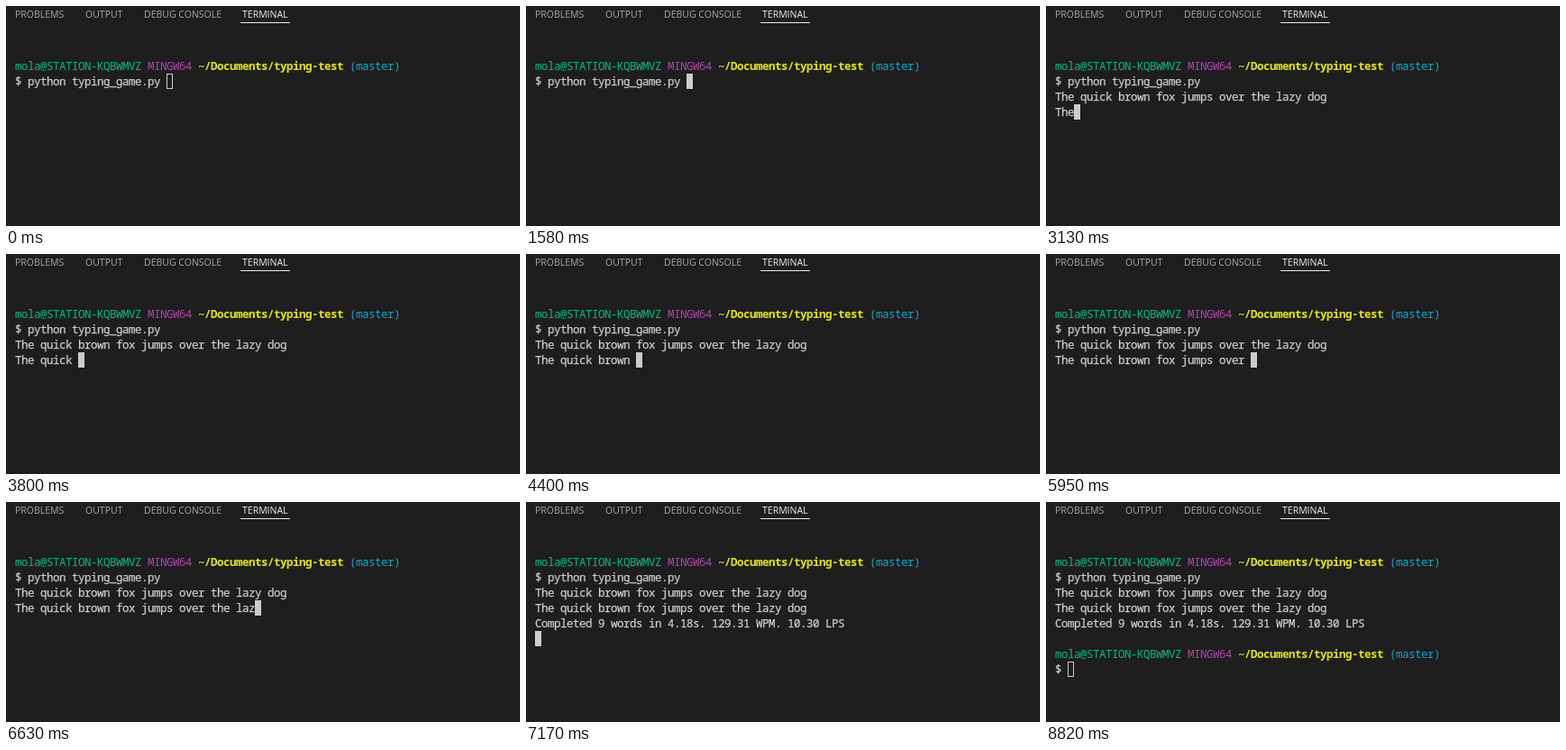
Animation, 570 px wide and 244 px high, one loop 8890 ms. Source, as an HTML page:

```html
<!DOCTYPE html>
<html lang="en">
<head>
<meta charset="utf-8">
<title>Typing test</title>
<style>
html, body { margin: 0; width: 100%; height: 100%; overflow: hidden; background: #1e1e1e; }
.tab {
  position: absolute; top: 0; white-space: nowrap; color: #a6a6a6;
  font: 10.5px/18px "Open Sans", "Noto Sans", sans-serif;
}
.active { color: #f0f0f0; font-weight: 500; }
.active::after {
  content: ""; position: absolute; left: -2px; top: 18px;
  width: 55px; height: 1px; background: #e7e7e7;
}
#term {
  position: absolute; left: 10px; top: 58px; margin: 0; color: #ccc;
  font: 12.5px/17px "Noto Sans Mono", "DejaVu Sans Mono", monospace;
  letter-spacing: calc(7px - 1ch); font-variant-ligatures: none;
  -webkit-text-stroke: 0.25px;
}
#term div { height: 17px; }
#term span { -webkit-text-stroke: 0; }
#cursor {
  position: absolute; box-sizing: border-box; width: 7px; height: 17px;
  border: 1px solid #ccc;
}
.user { color: #0dbc79; }
.sys { color: #ae45ae; }
.path { color: #e5e510; font-weight: 600; }
.branch { color: #11a8cd; }
</style>
</head>
<body>
<span class="tab" style="left:10px">PROBLEMS</span>
<span class="tab" style="left:88px">OUTPUT</span>
<span class="tab" style="left:153px">DEBUG CONSOLE</span>
<span class="tab active" style="left:262px">TERMINAL</span>
<pre id="term"></pre>
<div id="cursor"></div>
<script>
const LOOP = 8890, CELL_W = 7, CELL_H = 17;
const FOCUS = 1580, ENTER = 2180, START = 2250, DONE = 7170, PROMPT = 7240, BLUR = 8820;
const SENTENCE = "The quick brown fox jumps over the lazy dog";
const COMMAND = "$ python typing_game.py";
const prompt = '<span class="user">mola@STATION-KQBWMVZ</span> <span class="sys">MINGW64</span> ' +
  '<span class="path">~/Documents/typing-test</span> <span class="branch">(master)</span>';

// Bursts of even typing: first key, last key, letters
const bursts = [
  [2910, 2980, 2], [3130, 3600, 7], [3800, 4400, 7],
  [4600, 4930, 4], [5130, 5390, 3], [5460, 5950, 8],
  [6020, 6430, 6], [6630, 6830, 3], [7030, DONE, 3]
];

const term = document.getElementById("term");
const cursor = document.getElementById("cursor");
let shown = "";

function lettersTyped(t) {
  let sum = 0;
  for (const [first, last, count] of bursts) {
    if (t < first) break;
    const part = Math.min(1, (t - first) / (last - first));
    sum += 1 + Math.floor(part * (count - 1));
  }
  return sum;
}

// Returns the terminal lines and the cursor's column and row
function screen(t) {
  const lines = [prompt, COMMAND];
  if (t < ENTER) return [lines, COMMAND.length + 1, 1];
  if (t < START) return [lines, 0, 2];
  const typed = lettersTyped(t);
  lines.push(SENTENCE, SENTENCE.slice(0, typed));
  if (t < DONE) return [lines, typed, 3];
  lines.push("Completed 9 words in 4.18s. 129.31 WPM. 10.30 LPS");
  if (t < PROMPT) return [lines, 0, 5];
  lines.push("", prompt, "$");
  return [lines, 2, 7];
}

function draw(now) {
  const t = now % LOOP;
  const [lines, col, row] = screen(t);
  const html = lines.map(line => `<div>${line}</div>`).join("");
  if (html !== shown) term.innerHTML = shown = html;
  cursor.style.left = 10 + col * CELL_W + "px";
  cursor.style.top = 58 + row * CELL_H + "px";
  cursor.style.background = t >= FOCUS && t < BLUR ? "#ccc" : "none";
}

const begin = performance.now();
function tick() {
  draw(performance.now() - begin);
  requestAnimationFrame(tick);
}
tick();
</script>
</body>
</html>
```
